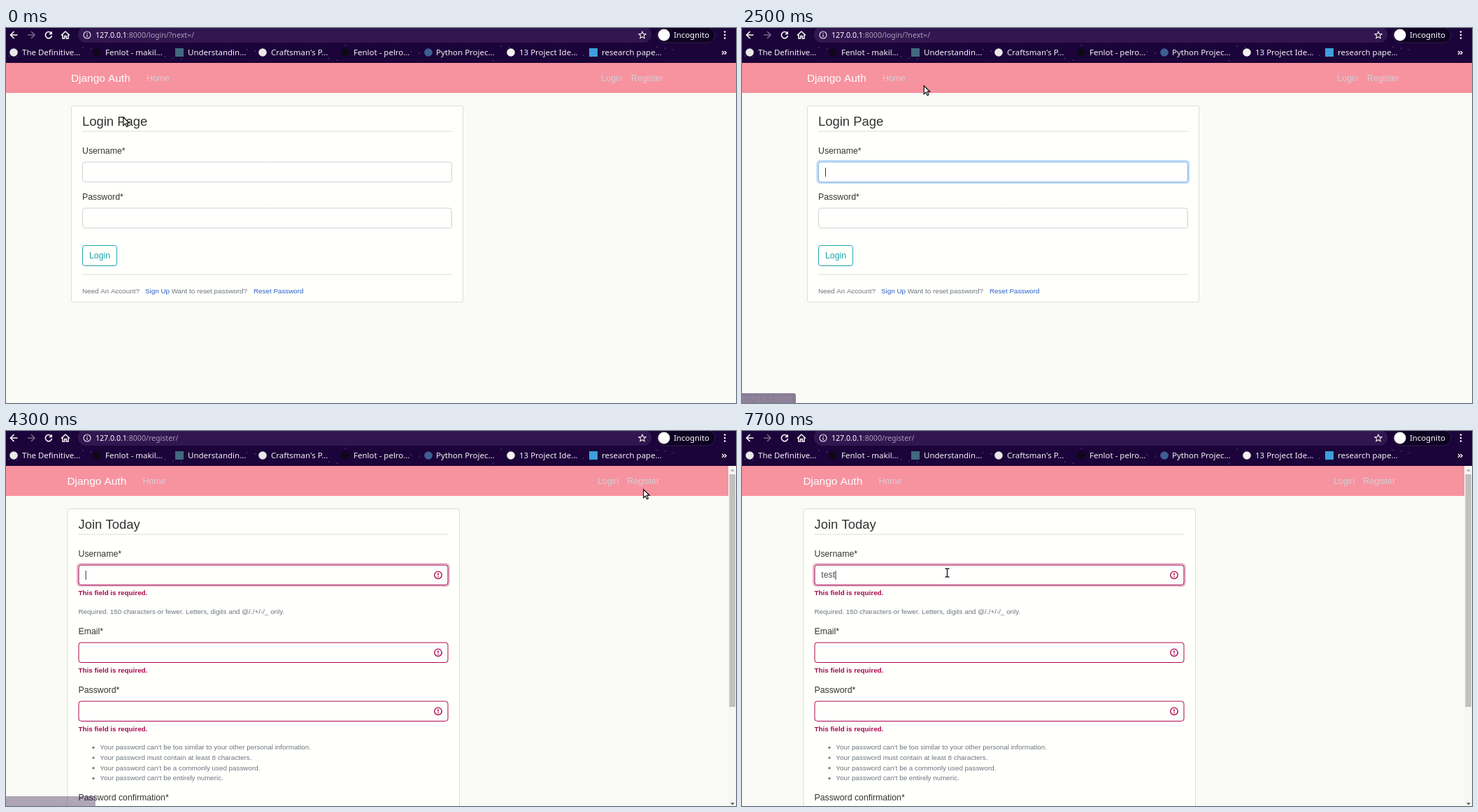
An HTML page with a canvas for the animation above (8 s loop, 1044 px wide and 537 px high).

```html
<!DOCTYPE html>
<html lang="en">
<head>
<meta charset="utf-8">
<title>Login and register</title>
<style>
  html, body { margin: 0; width: 100%; height: 100%; overflow: hidden; background: #fafaf6; }
  canvas { display: block; }
</style>
</head>
<body>
<canvas id="stage" width="1044" height="537"></canvas>
<script>
const ctx = document.getElementById('stage').getContext('2d');
const LOOP = 8000, STEP = 100;
const SANS = '"Liberation Sans", Arial, sans-serif';
const UI = '"Noto Sans", "Open Sans", sans-serif';
const WINE = '#a9064f', TOOLBAR = '#1b0439';

// Pointer path: time, x, y
const PATH = [
  [0, 167, 127], [100, 167, 123], [900, 167, 123], [1600, 221, 81], [2400, 221, 81],
  [2600, 298, 83], [2800, 495, 127], [3000, 495, 127], [3300, 924, 81], [3700, 924, 81],
  [3800, 926, 81], [4100, 926, 81], [4300, 911, 83], [4600, 480, 245], [4800, 480, 245],
  [5100, 295, 204], [5400, 293.5, 203], [LOOP, 293.5, 203]
];

const clamp = v => Math.max(0, Math.min(1, v));
const within = (t, a, b) => t >= a && t < b;

function pointerAt(t) {
  const i = PATH.findIndex(p => p[0] > t);
  const [t0, x0, y0] = PATH[i - 1], [t1, x1, y1] = PATH[i];
  const k = (t - t0) / (t1 - t0);
  return [x0 + (x1 - x0) * k, y0 + (y1 - y0) * k];
}

function text(s, x, y, size, color, family = SANS, weight = '') {
  ctx.font = `${weight} ${size}px ${family}`;
  ctx.fillStyle = color;
  ctx.fillText(s, x, y);
}

function box(x, y, w, h, r, fill, stroke, width = 1) {
  ctx.beginPath();
  ctx.roundRect(x, y, w, h, r);
  if (fill) { ctx.fillStyle = fill; ctx.fill(); }
  if (stroke) { ctx.strokeStyle = stroke; ctx.lineWidth = width; ctx.stroke(); }
}

function disc(x, y, r, fill) {
  ctx.beginPath();
  ctx.arc(x, y, r, 0, Math.PI * 2);
  ctx.fillStyle = fill;
  ctx.fill();
}

function path(d, x, y, stroke, width = 1.5, fill) {
  const p = new Path2D(d);
  ctx.save();
  ctx.translate(x, y);
  ctx.lineWidth = width;
  if (fill) { ctx.fillStyle = fill; ctx.fill(p); }
  if (stroke) { ctx.strokeStyle = stroke; ctx.stroke(p); }
  ctx.restore();
}

function drawToolbar(url, loading) {
  ctx.fillStyle = TOOLBAR;
  ctx.fillRect(0, 0, 1044, 50);
  for (let i = 0; i < 26; i++) disc((i * 117.3 + 110) % 1044, 25 + (i * 13 + 3) % 23, .7, '#775b9c');

  path('M5 0H-4M0 -5L-5 0L0 5', 11.5, 10, '#fff', 1.6);
  path('M-5 0H4M0 -5L5 0L0 5', 36, 10, '#75658a', 1.6);
  if (loading) path('M-4 -4L4 4M4 -4L-4 4', 61, 10, '#fff', 1.6);
  else {
    path('M3.6 -2.8A4.6 4.6 0 1 0 4.5 1', 61, 10, '#fff', 1.6);
    path('M5 -5.5V-.7H.2Z', 61, 10, null, 0, '#fff');
  }
  path('M-6 .5L0 -5L6 .5M-4 -.5V5H-1.3V1.5H1.3V5H4V-.5', 85, 10, '#fff', 1.5);

  box(103, -2, 820, 23, 11, '#321650');
  path('M5 0A5 5 0 1 1 -5 0A5 5 0 1 1 5 0M0 -.8V3M0 -3V-1.8', 116, 10, '#e8e2ee', 1.2);
  const host = '127.0.0.1';
  text(host, 128, 14, 10.6, '#fff', UI);
  text(url, 128 + ctx.measureText(host).width, 14, 10.6, '#aa9cb8', UI);
  path('M0 -5L1.5 -1.6L5 -1.3L2.3 1L3.1 4.6L0 2.7L-3.1 4.6L-2.3 1L-5 -1.3L-1.5 -1.6Z', 910, 10, '#eee', 1.1);
  box(931, -1, 83, 22, 11, '#0e0222', '#3d2852', .8);
  disc(941, 10, 8.5, '#fff');
  text('Incognito', 955, 14, 11.3, '#fff', UI);
  for (const y of [5.5, 10, 14.5]) disc(1028, y, 1.3, '#fff');

  const bookmarks = [
    [11, 23, '#e8e8e8', 'The Definitive…'], [130, 142, '#0d0818', 'Fenlot - makil…'],
    [248, 260, '#42697e', 'Understandin…', 1], [367, 379, '#e8e8e8', "Craftsman's P…"],
    [485, 497, '#0d0818', 'Fenlot - pelro…'], [604, 615, '#3f5f93', 'Python Projec…'],
    [722, 734, '#f2f2f2', '13 Project Ide…'], [840, 852, '#3d9fdb', 'research pape…', 1]
  ];
  for (const [iconX, x, color, label, square] of bookmarks) {
    if (square) box(iconX - 6, 29, 12, 12, 0, color);
    else disc(iconX, 35, 5.8, color);
    text(label, x, 39, 11.5, '#f4f0f7', UI);
  }
  path('M-3 -2.5L-.5 0L-3 2.5M.5 -2.5L3 0L.5 2.5', 1027, 35.5, '#fff', 1.4);
}

function drawHeader(left, width, hover) {
  ctx.fillStyle = '#f7929f';
  ctx.fillRect(0, 50, width, 43);
  const link = (s, x) => text(s, left + x, 75.5, 12.3, hover === s ? '#fff' : '#d4d0d5');
  text('Django Auth', left, 76.5, 15.4, '#fff');
  link('Home', 108);
  link('Login', 758.5);
  link('Register', 801);
}

function rule(x, y) {
  ctx.fillStyle = '#dcdcdc';
  ctx.fillRect(x, y, 529, 1);
}

// Input with a focus ring whose strength runs from 0 to 1
function field(x, y, border, ring, glow = 0) {
  if (glow) {
    ctx.globalAlpha = glow;
    box(x - 1.2, y - 1.2, 531, 31.4, 4, null, ring, 2.8);
    ctx.globalAlpha = 1;
  }
  box(x + .5, y + .5, 528, 28.5, 3.5, '#fffffd', border);
}

function caret(x) {
  ctx.fillStyle = '#333';
  ctx.fillRect(x, 200, 1, 13);
}

function drawLogin(t) {
  const hover = within(t, 1500, 2000) ? 'Home' : within(t, 3200, 4200) ? 'Register' : '';
  drawHeader(93, 1044, hover);
  box(93.5, 111.5, 560, 281, 2.5, '#fffffc', '#dcdcda');
  text('Login Page', 109, 140, 18.45, '#333');
  rule(109, 147.5);

  const glow = Math.min(clamp((t - 2050) / 150), clamp((3950 - t) / 150));
  text('Username*', 109, 180, 12.3, '#333');
  field(109, 191.5, glow ? '#86b4e6' : '#cfd2d5', '#bfdcf8', glow < .5 ? glow * .3 : glow);
  if (within(t, 2100, 2600) || within(t, 3100, 3600)) caret(119);
  text('Password*', 109, 246, 12.3, '#333');
  field(109, 257.5, '#cfd2d5');

  box(109.5, 311.5, 49, 29, 3, null, '#22a3a8');
  text('Login', 119, 330, 12.3, '#18a3a8');
  rule(109, 352.5);
  text('Need An Account?', 109, 379.5, 9.84, '#6c757d');
  text('Sign Up', 199, 379.5, 9.84, '#2b62c6');
  text('Want to reset password?', 236.7, 379.5, 9.84, '#6c757d');
  text('Reset Password', 354, 379.5, 9.84, '#2b62c6');
}

function drawRegister(t) {
  const x = 103.5;
  drawHeader(87.5, 1033, '');
  box(88, 111.5, 560.5, 500, 2.5, '#fffffc', '#dcdcda');
  text('Join Today', x, 140, 18.45, '#333');
  rule(x, 147.5);

  const rows = [['Username*', 191.5], ['Email*', 302.5], ['Password*', 386.5]];
  rows.forEach(([label, y], i) => {
    text(label, x, y - 11.5, 12.3, '#333');
    field(x, y, WINE, '#e6bccd', i ? 0 : 1);
    path('M5.2 0A5.2 5.2 0 1 1 -5.2 0A5.2 5.2 0 1 1 5.2 0M0 -3V.8M0 1.8V3.2', 618, y + 14.8, WINE, 1.4);
    text('This field is required.', x, y + 43, 9.84, WINE, SANS, 'bold');
  });
  text('Required. 150 characters or fewer. Letters, digits and @/./+/-/_ only.', x, 261.5, 9.84, '#6c757d');
  [
    'Your password can’t be too similar to your other personal information.',
    'Your password must contain at least 8 characters.',
    'Your password can’t be a commonly used password.',
    'Your password can’t be entirely numeric.'
  ].forEach((s, i) => {
    const y = 456.3 + i * 14.7;
    disc(125, y - 3, 1.6, '#6c757d');
    text(s, 134.3, y, 9.84, '#6c757d');
  });
  text('Password confirmation*', x, 529, 12.3, '#333');

  const typed = 'test'.slice(0, [6800, 7100, 7300, 7700].filter(at => t >= at).length);
  text(typed, 113.3, 210, 12.3, '#495057');
  const blink = within(t, 4200, 4900) || within(t, 5400, 5800) || t >= 6400;
  if (blink) caret(113.7 + ctx.measureText(typed).width);

  ctx.fillStyle = '#f6f6f4';
  ctx.fillRect(1033, 50, 11, 487);
  ctx.fillStyle = '#c0c0be';
  ctx.fillRect(1034.5, 62, 8.5, 333);
  path('M-3 1.5L0 -1.5L3 1.5Z', 1039, 56, null, 0, '#a0a0a0');
  path('M-3 -1.5L0 1.5L3 -1.5Z', 1039, 534, null, 0, '#505050');
}

function drawStatus(label, width, alpha) {
  ctx.globalAlpha = alpha;
  box(-5, 523, width + 5, 20, [0, 3, 0, 0], TOOLBAR);
  text(label, -1, 536, 10.6, '#a79bb3', UI);
  ctx.globalAlpha = 1;
}

function drawPointer(t) {
  const [x, y] = pointerAt(t);
  if (t >= 5000) {
    const beam = 'M-3 -6H-1L0 -5L1 -6H3M0 -5V5M-3 6H-1L0 5L1 6H3';
    path(beam, x, y, '#fff', 3);
    path(beam, x, y, '#222', 1.4);
  } else if (within(t, 1500, 2500) || within(t, 3200, 3800)) {
    path('M-1.3 8V1.2Q0 -.6 1.3 1.2V5Q2.6 4 3.6 5.4Q5 4.6 6 5.9Q8.2 5.4 8.2 7.6V10L7 13.5H0L-3.6 9.2Q-4 7 -2.4 7.2Z',
      x, y, '#111', 1.1, '#fff');
    path('M2 8.5V11M4 8.5V11M6 8.5V11', x, y, '#111', .7);
  } else {
    path('M.7 .7V12.6L3.5 10L5.5 14.5L7.5 13.6L5.6 9.2H9.4Z', x, y, '#111', 1.2, '#fff');
  }
}

function draw(t) {
  const registered = t >= 4200;
  ctx.fillStyle = '#fafaf6';
  ctx.fillRect(0, 0, 1044, 537);
  if (registered) drawRegister(t); else drawLogin(t);
  drawToolbar(registered ? ':8000/register/' : ':8000/login/?next=/',
    within(t, 1900, 2100) || within(t, 4000, 4200));
  if (within(t, 1800, 2600)) drawStatus('127.0.0.1:8000', 77, clamp((2600 - t) / 200));
  if (within(t, 3500, 4400)) drawStatus('127.0.0.1:8000/register/', 128, clamp((4400 - t) / 290));
  drawPointer(t);
}

function frame() {
  draw(Math.floor(performance.now() % LOOP / STEP) * STEP);
  requestAnimationFrame(frame);
}
frame();
</script>
</body>
</html>
```
